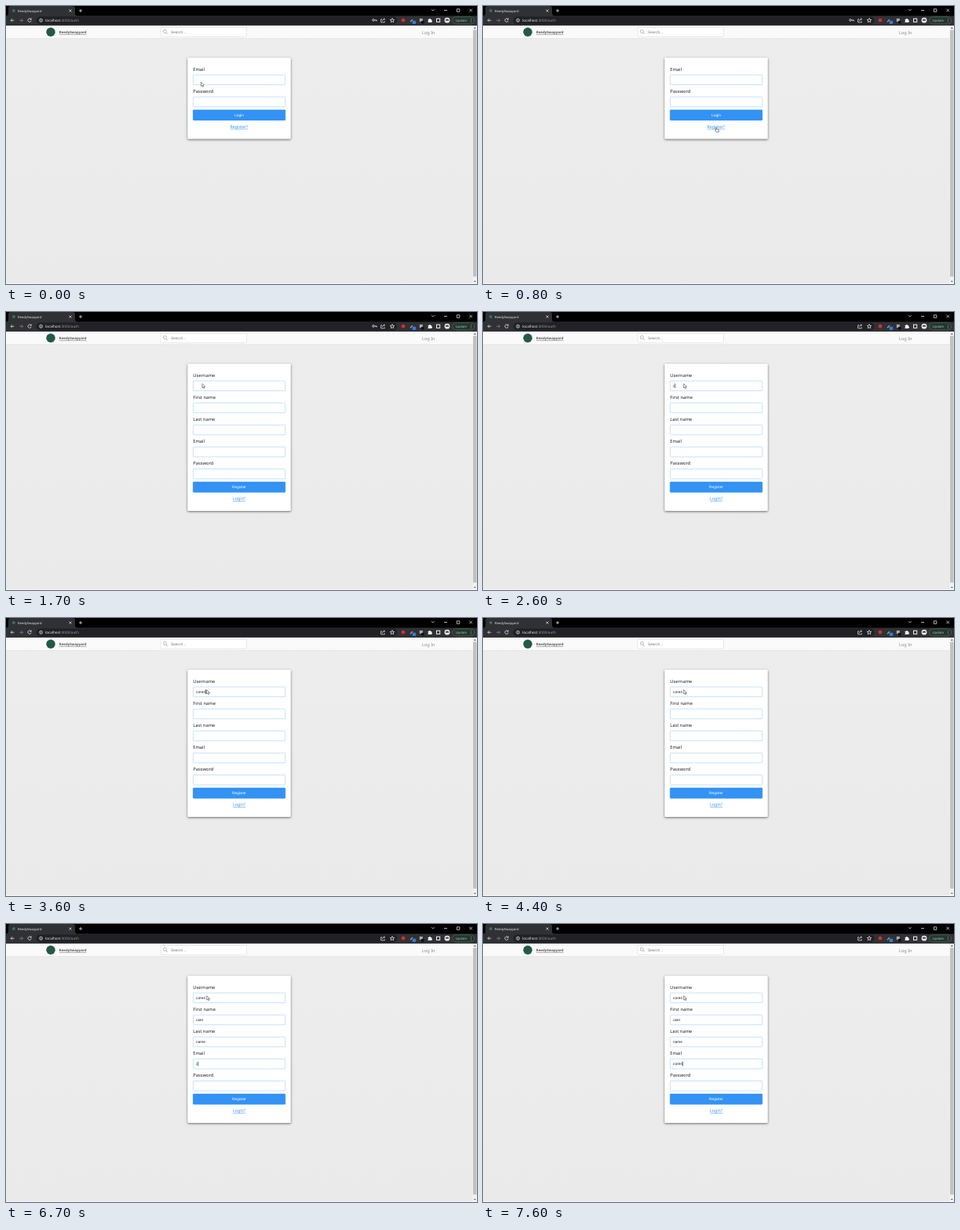
Animation, 600 px wide and 355 px high, one loop 8000 ms. Source, as an HTML page:

```html
<!DOCTYPE html>
<html lang="en">
<head>
<meta charset="utf-8">
<title>Registration form</title>
<style>
  html, body { margin: 0; width: 100%; height: 100%; overflow: hidden; background: #ebebec; }
  svg { display: block; width: 100vw; height: 100vh; }
  text { font-family: "Noto Sans", "Open Sans", sans-serif; text-rendering: geometricPrecision; }
  .label { font-size: 5.8px; fill: #222; }
  .arial { font-family: "Liberation Sans", Arial, sans-serif; font-size: 4.8px; }
  .link { font-size: 5.3px; fill: #3b93ec; text-decoration: underline; text-anchor: middle; }
  .input { fill: #fff; stroke: #b5dcf5; stroke-width: .8; }
  .line { fill: none; stroke: #dcdddf; stroke-width: .8; }
  .card { fill: #fff; filter: drop-shadow(0 1px 1.8px rgba(0, 0, 0, .55)); }
</style>
</head>
<body>
<svg viewBox="0 0 600 355" preserveAspectRatio="none">
  <defs>
    <linearGradient id="page" x2="0" y2="1">
      <stop stop-color="#ededee"/><stop offset="1" stop-color="#eaeaeb"/>
    </linearGradient>
  </defs>
  <rect width="600" height="355" fill="url(#page)"/>

  <!-- Site header -->
  <rect y="25" width="595" height="16.5" fill="#fafafa" style="filter:drop-shadow(0 .5px .7px rgba(0,0,0,.2))"/>
  <circle cx="57" cy="33.3" r="5.7" fill="#245947"/>
  <text x="67.8" y="35" font-size="4.4" font-weight="700" fill="#555" text-decoration="underline">ReedySwapyard</text>
  <rect x="197" y="27.3" width="109.5" height="12" rx="1" fill="#fff" stroke="#dedede" stroke-width=".7"/>
  <g fill="none" stroke="#999" stroke-width=".7"><circle cx="202.4" cy="32.4" r="2"/><path d="M203.9 33.9l2 2"/></g>
  <text class="arial" x="210" y="34.8" fill="#777">Search...</text>
  <text x="530" y="35.7" font-size="5.6" fill="#8b8b8b">Log In</text>

  <!-- Scrollbar -->
  <rect x="594.5" y="25" width="5.5" height="330" fill="#f1f1f1"/>
  <rect x="595" y="30.5" width="4.5" height="315" fill="#c1c1c1"/>
  <path d="M595.8 28.7l1.5-1.6 1.5 1.6zM595.8 351l1.5 1.6 1.5-1.6z" fill="#555"/>
  <rect y="354" width="600" height="1" fill="#f8f8f8"/>

  <!-- Browser window -->
  <rect width="600" height="13" fill="#000"/>
  <path d="M0 12.5q3 0 3-3V3q0-3 3-3h79q3 0 3 3v6.5q0 3 3 3h509V25H0z" fill="#303135"/>
  <rect x="38.5" y="13.5" width="460" height="10" rx="5" fill="#202124"/>
  <circle cx="9.8" cy="6" r="2" fill="#2f7560"/>
  <text x="15" y="7.5" font-size="4.1" fill="#dfe0e2">ReedySwapyard</text>
  <path class="line" d="M80.4 4.5l3 3m0-3l-3 3M93 6h4m-2-2v4"/>
  <path class="line" d="M542 4.2l1.8 1.8 1.8-1.8M558 5.5h4M574.3 3.8h3.5v3.5h-3.5zM590.3 3.7l3.6 3.6m0-3.6l-3.6 3.6"/>
  <path class="line" d="M10.5 18.3H6m2-2l-2 2 2 2"/>
  <path class="line" d="M17 18.3h4.5m-2-2l2 2-2 2" style="stroke:#85868a"/>
  <path class="line" d="M31.7 16.7a2.2 2.2 0 1 0 .5 2M32.2 15.5v1.8h-1.8"/>
  <circle class="line" cx="44.5" cy="18.3" r="2"/><path class="line" d="M44.5 18v1.4m0-2.3v.4"/>
  <text x="50" y="20" font-size="4.6" fill="#f1f1f1">localhost<tspan fill="#999ca1">:3000/auth</tspan></text>
  <g id="key"><circle class="line" cx="468" cy="18" r="1.3"/><path class="line" d="M469.3 18h3v1.4m-1.3-1.4v1.2"/></g>
  <path class="line" d="M479 16.8h-1.3v4h4.7v-1.3M479.2 19q.4-2.2 3.2-2.2m-1.2-1.2l1.4 1.2-1.4 1.2"/>
  <path class="line" d="M492 15.5l.8 1.9 2 .1-1.6 1.3.6 2-1.8-1.1-1.8 1.1.6-2-1.6-1.3 2-.1z"/>
  <circle cx="506" cy="18.2" r="2.4" fill="#d82c2c"/>
  <path d="M515 20.3l3-3" stroke="#a0a3a8" stroke-width="1.3"/>
  <rect x="517.7" y="18.7" width="4.5" height="4.2" rx=".8" fill="#2d7de0"/>
  <rect x="526.8" y="16" width="4" height="4" fill="#aaa"/>
  <rect x="529" y="19" width="3.6" height="3.7" rx=".7" fill="#111"/>
  <path d="M537.5 17h1.3a1 1 0 0 1 2 0h1.3v1.4a1 1 0 0 1 0 2V21h-4.6v-1.2a1 1 0 0 0 0-1.8z" fill="#f1f1f1"/>
  <rect x="548.5" y="16.2" width="4.2" height="4.2" fill="none" stroke="#f1f1f1" stroke-width="1"/>
  <circle cx="562" cy="18.2" r="3.4" fill="#e6e6e6"/>
  <path d="M559.8 18.8a2.2 2.2 0 0 1 4.4 0z" fill="#45474b"/>
  <rect x="568.7" y="13.8" width="28" height="9.2" rx="4.6" fill="#26352e" stroke="#587665" stroke-width=".6"/>
  <text x="572.5" y="19.9" font-size="4.2" fill="#91cda5">Update</text>
  <path d="M592.5 16.2v.8m0 1v.8m0 1v.8" stroke="#91cda5" stroke-width=".8"/>

  <g id="login"></g>
  <g id="register"></g>
  <rect id="caret" width=".6" height="5.8" fill="#111"/>
  <g id="cursor" stroke-linejoin="round">
    <path id="arrow" d="M0 0v5.2l1.2-1 .8 1.8 1-.4-.8-1.8h1.6z" fill="#fff" stroke="#333" stroke-width=".55"/>
    <path id="hand" d="M0 .5q.6-.8 1.1 0v2l2.4.5q.7.2.6 1L3.7 6H.7L-1 3.8q.2-.7 1 0z" fill="#fff" stroke="#333" stroke-width=".55"/>
  </g>
</svg>
<script>
const LOOP = 8000;
const FIELD_TOP = 88, FIELD_STEP = 28.1;
const $ = id => document.getElementById(id);

// Each step holds until the next one: [time, ...state].
const cursorSteps = [
  [0, 248.5, 97.2], [400, 256, 110], [500, 280, 142], [600, 297, 156], [800, 296.5, 155],
  [1500, 294, 160], [1600, 270, 118], [1700, 250, 91.5], [1900, 255.7, 91.7]
];
const focusSteps = [[0, -1], [1900, 0], [3700, 1], [5300, 2], [6200, 3]];
const typing = [
  { text: "core4", keys: [2600, 2700, 2800, 3000, 3600] },
  { text: "user", keys: [4800, 4900, 5000, 5100] },
  { text: "name", keys: [5500, 5700, 5800, 5900] },
  { text: "core4", keys: [6700, 6900, 7100, 7300, 7600] }
];

const fieldTop = i => FIELD_TOP + i * FIELD_STEP;
const current = (steps, t) => steps.filter(step => step[0] <= t).pop();
const show = (id, visible) => $(id).setAttribute("visibility", visible ? "visible" : "hidden");

function form(labels, action, alternative) {
  const end = fieldTop(labels.length);
  const fields = labels.map((label, i) => `
    <text class="label" x="238.2" y="${fieldTop(i) - 5.4}">${label}</text>
    <rect class="input" x="238.4" y="${fieldTop(i)}" width="117.4" height="12.6" rx=".8"/>
    <text class="arial value" x="242" y="${fieldTop(i) + 8}" fill="#222"></text>`).join("");
  return `<rect class="card" x="231.3" y="66" width="131.5" height="${end - 40.5 + 66 - 66}" rx="1.3"/>
    ${fields}
    <rect x="238.3" y="${end - 11.5}" width="117.5" height="13.2" rx=".8" fill="#3293f5" stroke="#2580dc" stroke-width=".5"/>
    <text class="arial" x="297" y="${end - 3.2}" fill="#fff" text-anchor="middle">${action}</text>
    <text class="link" x="297" y="${end + 11.6}">${alternative}</text>`;
}

$("login").innerHTML = form(["Email", "Password"], "Login", "Register?");
$("register").innerHTML = form(["Username", "First name", "Last name", "Email", "Password"], "Register", "Login?");
const values = $("register").querySelectorAll(".value");

function render(t) {
  const registering = t >= 1200;
  show("login", !registering);
  show("register", registering);
  show("key", t < 2600);

  typing.forEach(({ text, keys }, i) => {
    values[i].textContent = text.slice(0, keys.filter(key => key <= t).length);
  });

  const focus = current(focusSteps, t)[1];
  show("caret", focus >= 0 && !(t >= 4400 && t < 4800));
  if (focus >= 0) {
    $("caret").setAttribute("x", 242.1 + values[focus].getComputedTextLength());
    $("caret").setAttribute("y", fieldTop(focus) + 3.3);
  }

  const [, x, y] = current(cursorSteps, t);
  const overLink = t >= 600 && t < 1200;
  $("cursor").setAttribute("transform", `translate(${x} ${y})`);
  show("arrow", !overLink);
  show("hand", overLink);
}

const start = performance.now();
function tick() {
  render((performance.now() - start) % LOOP);
  requestAnimationFrame(tick);
}
tick();
</script>
</body>
</html>
```
